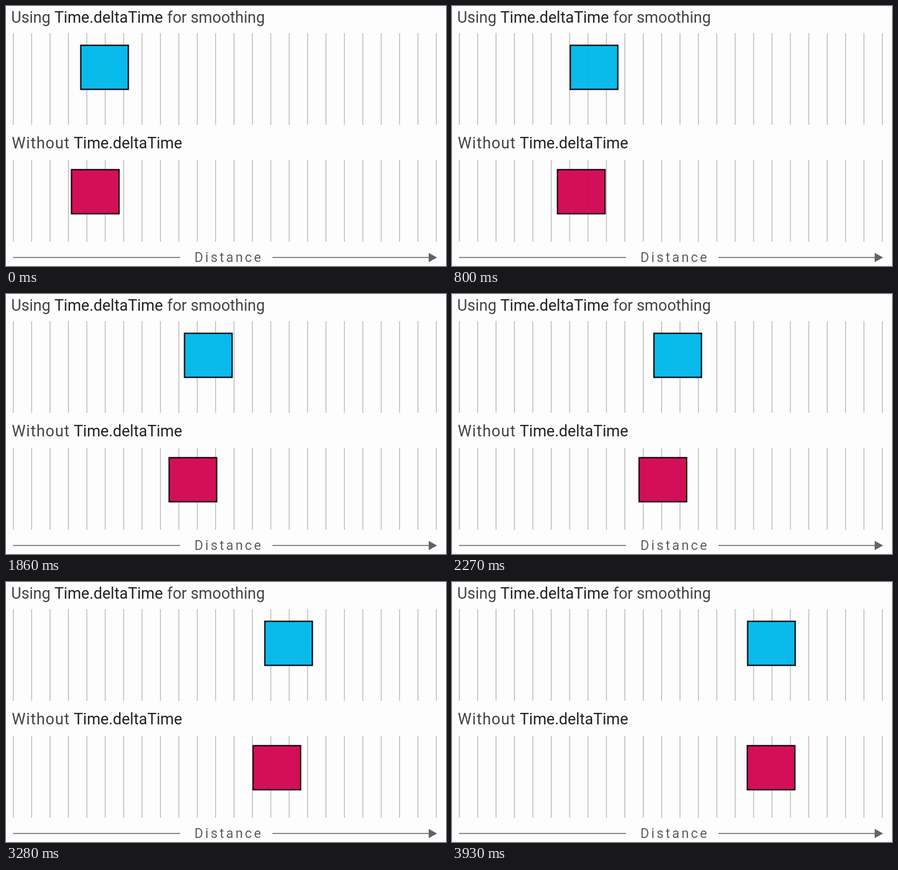
An HTML page with a canvas that plays this animation: 763 px wide and 451 px high, repeating every 4.03 s.

```html
<!DOCTYPE html>
<html lang="en">
<head>
<meta charset="utf-8">
<title>Smoothed and unsmoothed movement</title>
<style>
html, body { margin: 0; width: 100%; height: 100%; overflow: hidden; background: #fdfdfd; }
canvas { display: block; width: 763px; height: 451px; }
</style>
</head>
<body>
<canvas id="stage" width="763" height="451"></canvas>
<script>
const ctx = document.getElementById('stage').getContext('2d');
const LOOP = 4030;
const LAST = 66;
const LONG = [3, 6];
const SHORT = [15, 24, 33, 42, 65];

// Uneven progress of the unsmoothed square: [step, left edge]
const UNEVEN = [
  [0, 112.4], [9, 161.5], [13, 181.7], [18, 207.5], [24, 244.7], [27, 255.5], [36, 314.5],
  [38, 323.3], [45, 370.3], [54, 421.5], [55, 427.3], [63, 484.5], [66, 510.9]
];

const stepStarts = [0];
for (let i = 0; i < LAST; i++) {
  const hold = LONG.includes(i) ? 70 : SHORT.includes(i) ? 50 : 60;
  stepStarts.push(stepStarts[i] + hold);
}

function stepAt(time) {
  let i = LAST;
  while (stepStarts[i] > time) i--;
  return i;
}

function smoothX(step) {
  return 128.5 + 383 * step / LAST;
}

function unevenX(step) {
  const k = Math.max(1, UNEVEN.findIndex(p => p[0] >= step));
  const [s0, x0] = UNEVEN[k - 1];
  const [s1, x1] = UNEVEN[k];
  return x0 + (x1 - x0) * (step - s0) / (s1 - s0);
}

function line(x1, y1, x2, y2, color, width) {
  ctx.strokeStyle = color;
  ctx.lineWidth = width;
  ctx.beginPath();
  ctx.moveTo(x1, y1);
  ctx.lineTo(x2, y2);
  ctx.stroke();
}

function text(str, x, y, size, color, spacing = 0) {
  ctx.font = `400 ${size}px Roboto, "Open Sans", sans-serif`;
  ctx.letterSpacing = spacing + 'px';
  ctx.fillStyle = color;
  ctx.fillText(str, x, y);
}

function grid(top, bottom) {
  for (let i = 0; i < 24; i++) {
    const x = 12.6 + i * 31.9;
    line(x, top, x, bottom, '#acacac', 1.2);
  }
}

function square(x, y, fill, edge) {
  ctx.globalAlpha = 0.96;
  ctx.fillStyle = fill;
  ctx.fillRect(x + 1, y + 1, 82.8, 76.8);
  ctx.globalAlpha = 1;
  ctx.strokeStyle = edge;
  ctx.lineWidth = 2.4;
  ctx.strokeRect(x + 1.2, y + 1.2, 82.4, 76.4);
}

function axis() {
  const gray = '#626262';
  line(12, 436.3, 302, 436.3, gray, 1.6);
  line(462, 436.3, 736, 436.3, gray, 1.6);
  ctx.fillStyle = gray;
  ctx.beginPath();
  ctx.moveTo(733, 428.3);
  ctx.lineTo(747.5, 436.3);
  ctx.lineTo(733, 444.3);
  ctx.fill();
  text('Distance', 326.8, 444, 23, '#5e5e5e', 3.7);
}

function draw(time) {
  const step = stepAt(time);
  ctx.fillStyle = '#fdfdfd';
  ctx.fillRect(0, 0, 763, 451);
  grid(47, 206);
  grid(267, 409);

  text('Using', 9, 29, 27, '#444');
  text('Time.deltaTime', 84, 29, 27, '#222');
  text('for smoothing', 279.5, 29, 27, '#444');
  text('Without', 10, 247, 27, '#444', 1.1);
  text('Time.deltaTime', 117.5, 247, 27, '#222');
  axis();

  square(smoothX(step), 67, '#00b8ea', '#08131a');
  square(unevenX(step), 282.7, '#d20653', '#22000f');
}

let start = null;
function tick(now) {
  if (start === null) start = now;
  draw(Math.max(0, now - start) % LOOP);
  requestAnimationFrame(tick);
}
draw(0);
requestAnimationFrame(tick);
</script>
</body>
</html>
```
